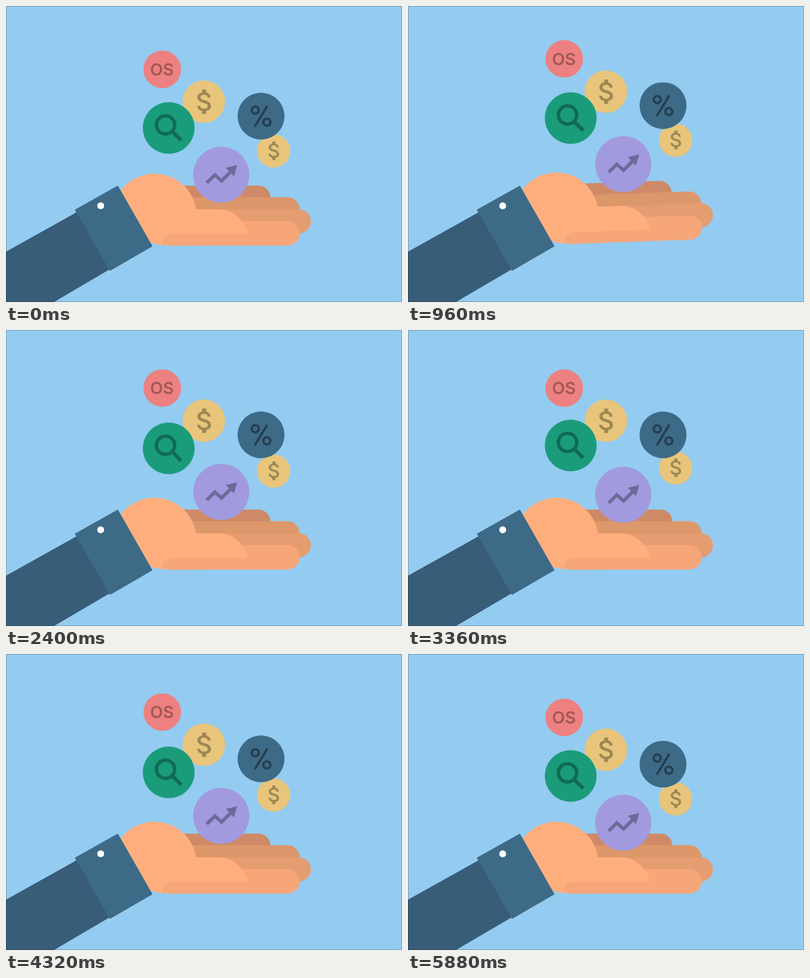
Animation of 800x600 px, one loop 5920 ms. Source, as an HTML page:

```html
<!DOCTYPE html>
<html lang="en">
<head>
<meta charset="utf-8">
<title>Hand with floating coins</title>
<style>
  html, body { margin: 0; width: 100%; height: 100%; overflow: hidden; background: #94cbf0; }
  svg { display: block; width: 100vw; height: 100vh; }

  .early, .mid, .late, .hand { animation: 5920ms cubic-bezier(.37, 0, .63, 1) infinite; }
  .early { animation-name: bob-early; }
  .mid { animation-name: bob-mid; }
  .late { animation-name: bob-late; }
  .hand { animation-name: lift; transform-origin: 230px 430px; }

  /* Three bobs of 1920 ms each; the groups are offset by about 80 ms. */
  @keyframes bob-early {
    0%, 31.081%, 63.514%, 95.946%, 100% { transform: translateY(0); }
    14.865%, 47.297%, 79.730% { transform: translateY(var(--rise)); }
  }
  @keyframes bob-mid {
    0%, 32.432%, 64.865%, 97.297%, 100% { transform: translateY(0); }
    16.216%, 48.649%, 81.081% { transform: translateY(var(--rise)); }
  }
  @keyframes bob-late {
    0%, 1.486%, 33.919%, 66.351%, 98.784%, 100% { transform: translateY(0); }
    17.703%, 50.135%, 82.568% { transform: translateY(var(--rise)); }
  }
  @keyframes lift {
    0%, 31.081%, 100% { transform: rotate(0deg); }
    14.865% { transform: rotate(-2deg); }
  }

  .icon { opacity: .31; }
  .line { fill: none; stroke: #000; }
  text { font: 600 34px Inter, Roboto, sans-serif; text-anchor: middle; }
</style>
</head>
<body>
<svg viewBox="0 0 800 600">
  <defs>
    <path id="dollar" transform="translate(-11.3 -12)" d="M11.8 10.9c-2.27-.59-3-1.2-3-2.15 0-1.09 1.01-1.85 2.7-1.85 1.78 0 2.44.85 2.5 2.1h2.21c-.07-1.72-1.12-3.3-3.21-3.81V3h-3v2.16c-1.94.42-3.5 1.68-3.5 3.61 0 2.31 1.91 3.46 4.7 4.13 2.5.6 3 1.48 3 2.41 0 .69-.49 1.79-2.7 1.79-2.06 0-2.87-.92-2.98-2.1h-2.2c.12 2.19 1.76 3.42 3.68 3.83V21h3v-2.15c1.95-.37 3.5-1.5 3.5-3.55 0-2.84-2.43-3.81-4.7-4.4z"/>
  </defs>

  <rect width="800" height="600" fill="#94cbf0"/>

  <g class="hand">
    <rect x="300" y="364" width="234" height="48" rx="24" fill="#ce8a67"/>
    <rect x="300" y="387.5" width="293" height="49" rx="24.5" fill="#dc976a"/>
    <rect x="300" y="412" width="316" height="49" rx="24.5" fill="#e59c70"/>
    <path fill="#f6a679" d="M330 436H568.5a24.75 24.75 0 0 1 0 49.5H330z"/>
    <path fill="#ffae7e" d="M215 425a85 85 0 0 1 169-13H430C458 412 482 432 489 462H338Q318 464 318 473L330 485.5Q308 485.5 290 479L250 470z"/>
    <path fill="#f6a679" d="M338 462H400V485.5H330Q318 485 314 479Q319 462 338 462z"/>
  </g>

  <path fill="#385d78" d="M0 498L150 414L216 530L97 600H0z"/>
  <path fill="#3d6a87" d="M226 364L296 487L210 537L139 413z"/>
  <circle cx="191.3" cy="405" r="7" fill="#fff"/>

  <g class="mid" style="--rise: -21.3px">
    <circle cx="315.7" cy="128.4" r="38" fill="#ed8080"/>
    <text class="icon" x="315" y="141">OS</text>
  </g>

  <g class="mid" style="--rise: -20.3px">
    <circle cx="399.7" cy="194" r="43" fill="#e8c57b"/>
    <g class="icon"><use href="#dollar" transform="translate(399.8 194) scale(2.75)"/></g>
  </g>

  <g class="late" style="--rise: -20.5px">
    <circle cx="328.7" cy="247.3" r="52.3" fill="#1a9c7b"/>
    <g class="icon line">
      <circle cx="322.3" cy="241" r="18.5" stroke-width="7"/>
      <path d="M335 253.5L354 272.5" stroke-width="7.5"/>
    </g>
  </g>

  <g class="late" style="--rise: -22.2px">
    <circle cx="540.7" cy="293.8" r="33.7" fill="#e8c57b"/>
    <g class="icon"><use href="#dollar" transform="translate(540.8 293.3) scale(2.1)"/></g>
  </g>

  <g class="mid" style="--rise: -21.5px">
    <circle cx="515.2" cy="223.3" r="47.3" fill="#3d6a87"/>
    <g class="icon line" stroke-width="4.6" style="opacity: .4">
      <circle cx="503.5" cy="211" r="7.2"/>
      <circle cx="527" cy="235.5" r="7.2"/>
      <path d="M528 202.5L502.5 244.5"/>
    </g>
  </g>

  <g class="early" style="--rise: -22px">
    <circle cx="434.8" cy="342" r="56.7" fill="#a29adf"/>
    <g class="icon">
      <path class="line" stroke-width="7" d="M405.5 358.5L422 342.5L435.5 354.5L458 332"/>
      <path d="M444 328L467 322.5L460.5 345z"/>
    </g>
  </g>

  <rect class="line" x=".5" y=".5" width="799" height="599" stroke-opacity=".3"/>
</svg>
</body>
</html>
```
